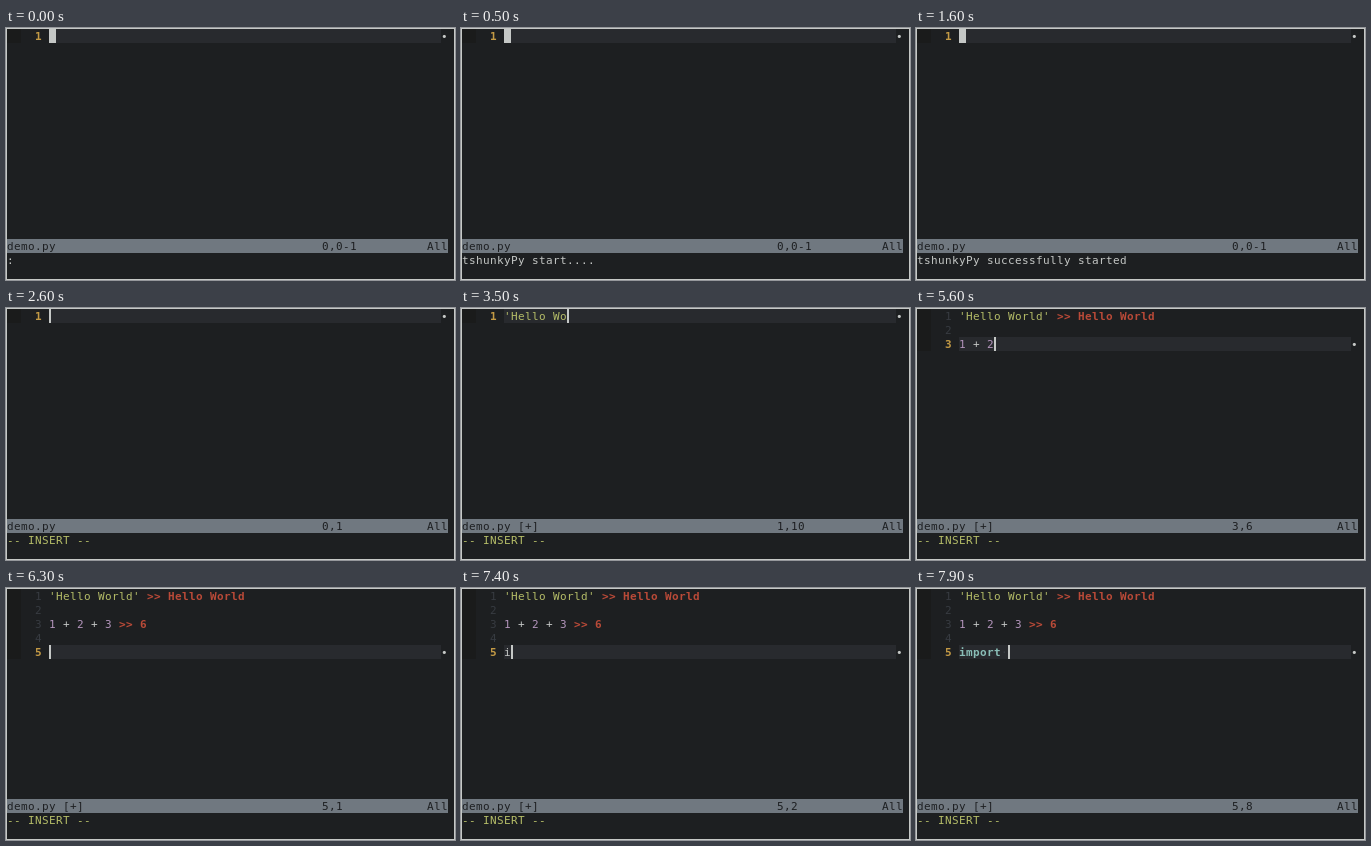
These frames come from a looping animation (449 px wide and 252 px high, 8000 ms). An HTML page:

```html
<!DOCTYPE html>
<html lang="en">
<head>
<meta charset="utf-8">
<title>Editor session</title>
<style>
  html, body { margin: 0; width: 100%; height: 100%; overflow: hidden; background: #1d1f21; }
  svg { display: block; width: 449px; height: 252px; }
  text {
    font: 11px "DejaVu Sans Mono", monospace;
    letter-spacing: 0.3775px; /* 7px cells */
    white-space: pre;
  }
  .bold { font-weight: bold; }
</style>
</head>
<body>
<svg id="screen" viewBox="0 0 449 252" xmlns="http://www.w3.org/2000/svg"></svg>
<script>
const LOOP = 8000, CELL_W = 7, CELL_H = 14, GUTTER = 6;
const C = {
  bg: '#1d1f21', fg: '#c5c8c6', line: '#282a2e', sign: '#1a1b1b', dim: '#373b41',
  bar: '#707880', current: '#c39a45', string: '#b5bd68', number: '#b294bb',
  keyword: '#8abeb7', result: '#b94a38'
};
const SOURCE = "'Hello World'\n\n1 + 2 + 3\n\nimport ";

// Typing bursts: start time, then characters typed at each 100 ms step
const BURSTS = [
  [2700, [1, 3, 4]],
  [3100, [5, 6, 7, 8, 9]],
  [3700, [10, 11, 12, 13, 14, 15]],
  [5300, [16, 17, 19, 20]],
  [5800, [21, 22, 23, 24, 25, 26]],
  [7400, [27, 28, 29, 31, 32, 33]]
];
// Evaluated output: row, characters needed, value
const RESULTS = [[0, 15, 'Hello World'], [2, 26, '6']];

const COMMAND = ':call tshunkypy#StartServer()';
const MESSAGES = [
  [0, ':'],
  [200, COMMAND.slice(0, 10)],
  [300, COMMAND.slice(0, 20)],
  [400, COMMAND],
  [500, 'tshunkyPy start....'],
  [1500, ''],
  [1600, 'tshunkyPy successfully started'],
  [2600, '-- INSERT --']
];

const screen = document.getElementById('screen');
const px = col => 1 + col * CELL_W;
const py = row => 1 + row * CELL_H;
const esc = s => s.replace(/&/g, '&amp;').replace(/</g, '&lt;').replace(/>/g, '&gt;');
const rect = (x, y, w, h, fill) =>
  `<rect x="${x}" y="${y}" width="${w}" height="${h}" fill="${fill}"/>`;
const text = (col, row, s, fill, bold) =>
  `<text x="${px(col)}" y="${py(row) + 11}" fill="${fill}"${bold ? ' class="bold"' : ''}>${esc(s)}</text>`;

function typedAt(t) {
  let n = 0;
  for (const [start, counts] of BURSTS) {
    if (t < start) break;
    n = counts[Math.min(counts.length - 1, Math.floor((t - start) / 100))];
  }
  return n;
}

function codeLine(row, s) {
  const body = s.replace(/ $/, '');
  let out = '';
  for (const m of body.matchAll(/('[^']*'?)|(\d+)|(\bimport\b)|[^'\d\s]+/g)) {
    const fill = m[1] ? C.string : m[2] ? C.number : m[3] ? C.keyword : C.fg;
    out += text(GUTTER + m.index, row, m[0], fill, m[3]);
  }
  if (body !== s) out += text(GUTTER + body.length, row, '·', C.dim);
  return out;
}

function draw(t) {
  const insert = t >= 2600;
  const n = typedAt(t);
  const lines = SOURCE.slice(0, n).split('\n');
  const row = lines.length - 1;
  const col = lines[row].length;
  const message = MESSAGES.filter(m => m[0] <= t).pop()[1];
  const position = !insert ? '0,0-1' : n ? `${row + 1},${col + 1}` : '0,1';

  let out = rect(0, 0, 449, 252, C.fg) + rect(1, 1, 447, 250, C.bg);
  out += rect(1, 1, 14, lines.length * CELL_H, C.sign);
  out += rect(px(GUTTER), py(row), 392, CELL_H, C.line);

  lines.forEach((s, i) => {
    const here = i === row;
    out += text(4, i, String(i + 1), here ? C.current : C.dim, here) + codeLine(i, s);
  });
  for (const [r, need, value] of RESULTS) {
    if (n >= need) out += text(GUTTER + lines[r].length + 1, r, '>> ' + value, C.result, true);
  }

  out += text(62, row, '•', C.fg);
  out += rect(px(GUTTER + col), py(row), insert ? 2 : CELL_W, CELL_H, C.fg);

  out += rect(1, py(15), 441, CELL_H, C.bar);
  out += text(0, 15, n ? 'demo.py [+]' : 'demo.py', C.bg);
  out += text(45, 15, position, C.bg) + text(60, 15, 'All', C.bg);
  out += text(0, 16, message, insert ? C.string : C.fg);
  return out;
}

const begin = performance.now();
let shown = '';
function tick() {
  const next = draw((performance.now() - begin) % LOOP);
  if (next !== shown) screen.innerHTML = shown = next;
  requestAnimationFrame(tick);
}
tick();
</script>
</body>
</html>
```
